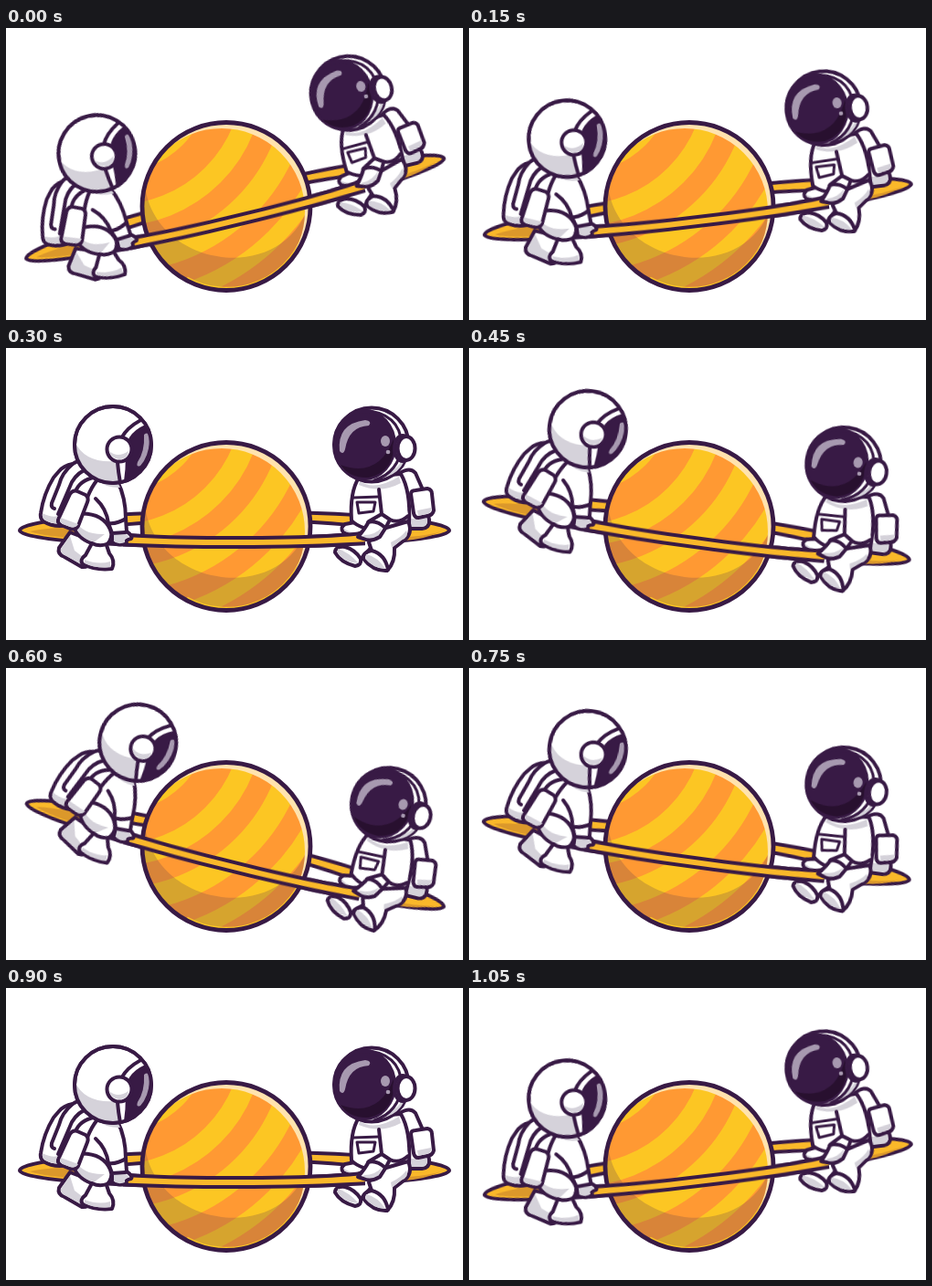
An HTML page that plays this animation: 500x320 px, repeating every 1200 ms.

```html
<!DOCTYPE html>
<html lang="en">
<head>
<meta charset="utf-8">
<title>Planet seesaw</title>
<style>
  html, body { margin: 0; width: 100%; height: 100%; overflow: hidden; background: #fff; }
  svg { display: block; width: 500px; height: 320px; }
  .seesaw { transform-origin: 241px 196px; animation: rock 1200ms step-end infinite; }
  @keyframes rock {
    0%, 100% { transform: rotate(-13.5deg); }
    12.5%, 87.5% { transform: rotate(-6.8deg); }
    25%, 75% { transform: rotate(0deg); }
    37.5%, 62.5% { transform: translate(-.5px, -1px) rotate(7.8deg); }
    50% { transform: translate(2px, 3px) rotate(13.9deg); }
  }
  .ink { stroke: #381a45; stroke-width: 4; stroke-linejoin: round; stroke-linecap: round; }
  .suit { fill: #fff; }
  .bare { stroke: none; }
  .shade { fill: #d5d2da; stroke: none; }
  .line { fill: none; }
  .dark { fill: #381a45; }
  .deep { fill: #28102f; stroke: none; }
  .glow { fill: #a799b0; stroke: none; }
  .gold { fill: #fab82a; }
  .dim { fill: #db982b; stroke: none; }
</style>
</head>
<body>
<svg viewBox="0 0 500 320">
  <defs>
    <clipPath id="disc"><circle cx="241" cy="195.5" r="91.5"/></clipPath>
    <clipPath id="frontHalf"><path d="M128 200H393V224H128Z"/></clipPath>
    <clipPath id="helmetL"><circle cx="117" cy="106" r="42"/></clipPath>
    <path id="ring" fill-rule="evenodd" d="M15 200A235 20.5 0 0 1 485 200A235 18 0 0 1 15 200Z
      M100 200A150 11 0 0 1 400 200A150 8 0 0 1 100 200Z"/>
  </defs>

  <g class="seesaw ink">
    <use href="#ring" class="gold"/>
    <path class="dim" d="M26 201Q50 196 90 196V208Q50 209 26 201ZM440 207Q465 205 476 201Q460 209 436 211Z"/>
  </g>

  <g clip-path="url(#disc)">
    <path fill="#fcc623" d="M145 100H337V292H145Z"/>
    <g fill="none" stroke="#ff9933" stroke-width="24">
      <circle cx="120" cy="55" r="121" stroke-width="35"/>
      <circle cx="120" cy="55" r="174"/>
      <circle cx="120" cy="55" r="225"/>
      <circle cx="120" cy="55" r="268"/>
    </g>
    <path fill="#794f49" opacity=".29" d="M148 172H152C162 265 310 285 333 187H340V292H148Z"/>
    <path fill="none" stroke="#fcc623" stroke-width="3" d="M198 274A89 89 0 0 0 328 217"/>
    <circle cx="236" cy="201" r="98" fill="none" stroke="#ffe3ae" stroke-width="14"/>
  </g>
  <circle class="ink line" cx="241" cy="195.5" r="92" style="stroke-width:4.8"/>

  <g class="seesaw ink">
    <!-- right rider, behind the front bar -->
    <g>
      <path class="suit" d="M431 137Q442 130 448 137L455 153L463 188Q464 197 455 198L434 198Z"/>
      <path class="shade" d="M442 187L461 187Q462 196 454 196H438Z"/>
      <path class="suit" d="M443 160Q443 156 448 156L461 154Q466 155 466 160L468 178Q467 183 461 184L451 186Q447 186 446 181Z"/>
      <path class="shade" d="M450 178L465 175Q466 181 460 182L451 184Z"/>
      <path class="suit" d="M387 190L371 193Q365 197 369 202L382 207L397 201Z"/>
      <path class="shade" d="M369 197Q376 204 390 202L382 205L371 201Z"/>
      <path class="suit" d="M391 201Q378 206 371 218Q360 217 360 224Q366 235 382 239Q389 238 388 231L402 216Z"/>
      <path class="shade" d="M363 220Q374 223 386 236Q370 235 363 225Z"/>
      <path class="line" d="M371 218Q382 221 388 231"/>
      <path class="suit" d="M386 142Q376 158 378 189Q391 203 430 199L441 192Q443 157 432 138Z"/>
      <path class="shade" d="M387 146Q403 157 430 141L432 148Q410 160 386 150Z"/>
      <path class="line" d="M380 164L408 163M384 169H404L402 179L386 181Z" style="stroke-width:3"/>
    </g>

    <g clip-path="url(#frontHalf)"><use href="#ring" class="gold"/></g>

    <!-- right rider, front limbs -->
    <g>
      <path class="suit" d="M440 190Q446 204 434 212L425 219Q426 235 417 244Q402 245 391 231Q390 224 400 222L397 213Q402 202 416 197Z"/>
      <path class="shade" d="M394 226Q407 229 415 242Q401 241 393 231ZM421 213Q432 208 438 200Q442 207 432 211L422 219Z"/>
      <path class="line" d="M400 222Q415 226 418 243"/>
      <path class="suit bare" d="M410 158L434 152L440 183Q430 193 420 188Q416 197 409 207Q399 213 391 209L385 207Q393 198 397 190L412 183Z"/>
      <path class="shade" d="M392 205Q404 205 412 196L407 206Q398 211 390 207Z"/>
      <path class="line" d="M408 155L411 182L397 190Q393 198 385 207L391 209Q399 213 409 207Q416 197 420 188Q430 193 440 184M411 182L420 188M396 191Q405 188 415 197"/>

      <circle class="suit" cx="400" cy="106" r="40.5"/>
      <path class="shade" d="M392 143Q425 140 434 122L439 112Q435 141 403 144Z"/>
      <path class="line" d="M388 68Q432 70 433 107Q430 136 403 145" style="stroke-width:3"/>
      <ellipse class="dark" cx="392" cy="106" rx="33" ry="37"/>
      <path class="deep" d="M424 100Q427 135 397 142Q376 143 366 128Q407 143 424 100Z"/>
      <path class="glow" d="M365 113Q362 83 393 79Q401 80 397 85Q375 86 371 111Q369 118 365 113Z"/>
      <ellipse class="glow" cx="415" cy="102" rx="5" ry="6"/>
      <circle class="glow" cx="418" cy="114" r="2.3"/>
      <ellipse class="suit" cx="434" cy="110" rx="9" ry="14"/>
      <ellipse class="suit" cx="438" cy="110" rx="9.5" ry="13"/>
    </g>

    <!-- left rider -->
    <g>
      <path class="suit" d="M70 202L58 219Q56 226 64 229L83 240Q91 241 90 234L99 213Z"/>
      <path class="shade" d="M70 206L60 220Q59 225 66 228L84 238L88 232L75 222Z"/>
      <path class="suit" d="M90 142Q108 135 122 146Q131 164 131 187L132 201Q139 206 137 209Q130 210 132 214Q123 218 115 212L82 206L72 174Z"/>
      <path class="shade" d="M96 143Q108 153 125 153L122 147Q108 140 96 143Z"/>
      <path class="suit" d="M76 182Q105 179 114 199Q118 208 110 216L113 225Q120 233 116 242Q98 244 84 237Q80 232 87 227L94 214Q77 208 74 194Z"/>
      <path class="shade" d="M76 189Q84 205 108 204L96 213Q79 207 76 195ZM86 232Q101 238 114 234L114 240Q99 242 86 236Z"/>
      <path class="line" d="M94 214Q102 218 110 215"/>
      <path class="shade" d="M117 204L131 204Q138 207 130 209L130 213Q122 216 117 211Z"/>
      <path class="line" d="M98 165Q110 176 112 192L116 203V211M112 192Q122 193 131 187M116 203L131 202"/>

      <path class="suit" d="M38 181Q41 160 52 142L58 135Q63 129 73 127Q81 121 91 126Q101 132 103 141Q90 154 83 183L68 194Q52 197 41 190Q37 187 38 181Z"/>
      <path class="shade" d="M40 181Q53 188 62 182L64 192Q52 194 43 189Q39 187 40 181Z"/>
      <path class="line" d="M73 127Q61 137 58 150L50 170Q49 175 53 176M102 141Q83 143 77 155L68 177M92 131Q78 136 72 147L57 182"/>
      <path class="suit" d="M70 160Q73 155 78 157L87 161Q91 164 89 169L79 195Q76 200 70 198L60 194Q55 191 58 186Z"/>
      <path class="shade" d="M60 186L79 193Q76 198 70 196L62 193Q58 191 60 186Z"/>

      <circle class="suit" cx="117" cy="106" r="42"/>
      <g clip-path="url(#helmetL)">
        <path class="shade" d="M75 102Q86 127 121 124L130 150H75Z"/>
        <path class="suit" d="M154 76Q118 91 122 125Q123 138 126 153L170 146V76Z"/>
        <path class="dark" d="M164 82Q131 91 133 116Q133 136 130 153L170 148Z"/>
        <path class="glow" d="M151 95Q157 90 157 102Q156 119 147 129Q142 131 144 125Q152 113 151 95Z"/>
      </g>
      <circle class="line" cx="117" cy="106" r="42"/>
      <circle class="suit" cx="124" cy="111" r="13.5"/>
      <path class="shade" d="M113 113Q122 121 134 113Q133 122 124 122Q115 121 113 113Z"/>
    </g>
  </g>
</svg>
</body>
</html>
```
